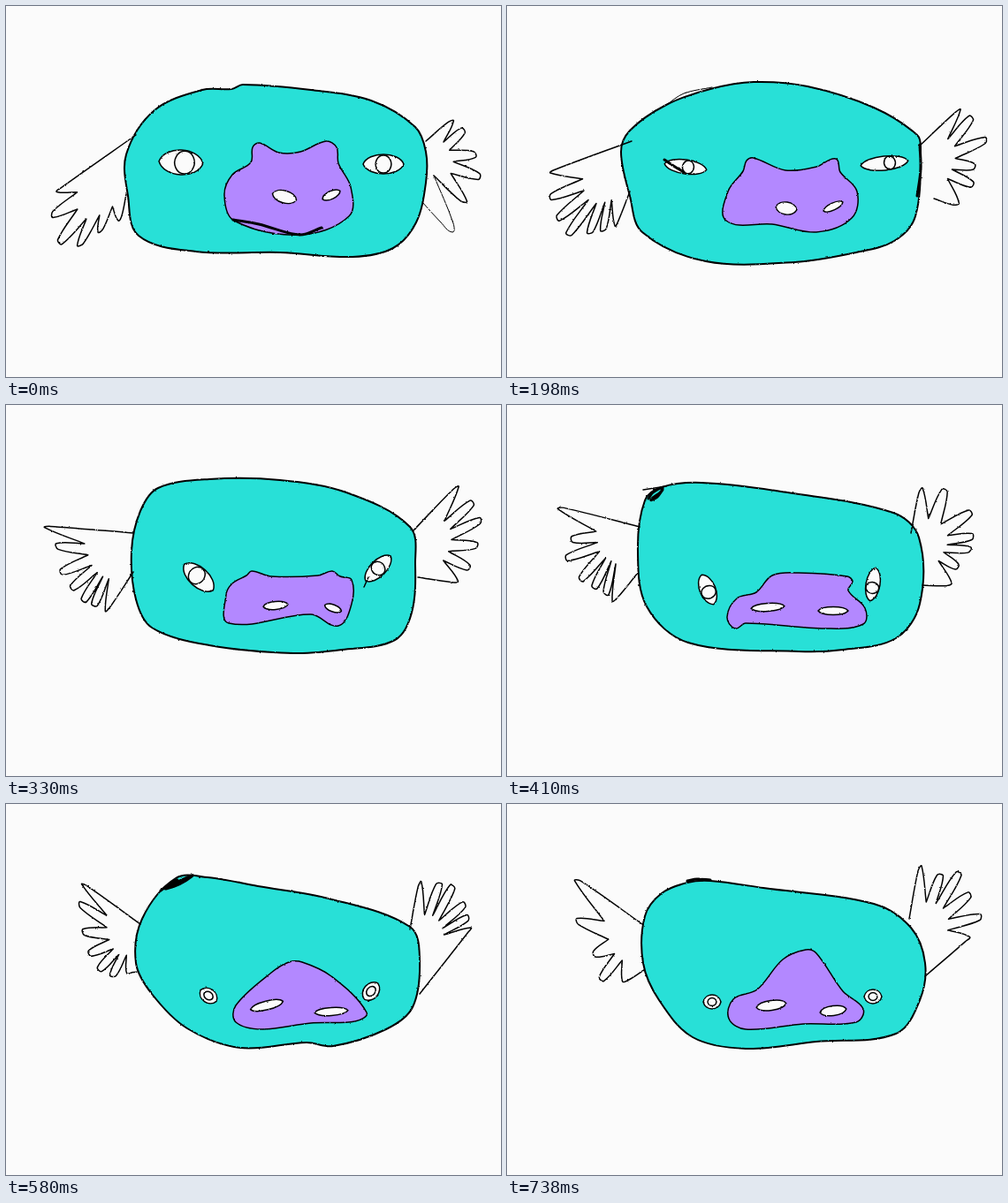
An HTML page that plays this animation: 560 by 420 pixels, repeating every 0.79 s.

```html
<!DOCTYPE html>
<html lang="en">
<head>
<meta charset="utf-8">
<title>Flapping creature</title>
<style>
  html, body { margin: 0; width: 100%; height: 100%; overflow: hidden; background: #fbfbfb; }
  #stage { width: 560px; height: 420px; overflow: hidden; }
  #strip { display: block; width: 3920px; height: 420px; animation: flip 790ms step-end infinite; }
  /* one pose per 560px cell, with uneven holds */
  @keyframes flip {
    0% { transform: translateX(0); }
    15.19% { transform: translateX(-560px); }
    31.646% { transform: translateX(-1120px); }
    41.772% { transform: translateX(-1680px); }
    51.899% { transform: translateX(-2240px); }
    73.418% { transform: translateX(-2800px); }
    83.544% { transform: translateX(-3360px); }
  }
  path { fill: none; stroke: #000; stroke-width: 1.5; stroke-linecap: round; stroke-linejoin: round; }
  .body { fill: #28e0d7; stroke-width: 2; }
  .snout { fill: #b388ff; }
  .white { fill: #fbfbfb; }
  .thin { stroke-width: 1; }
  .heavy { stroke-width: 3; }
</style>
</head>
<body>
<div id="stage">
  <svg id="strip" viewBox="0 0 3920 420">
    <filter id="rough" x="-5%" y="-5%" width="110%" height="110%" color-interpolation-filters="sRGB">
      <feTurbulence type="fractalNoise" baseFrequency=".35" numOctaves="2" seed="4"/>
      <feDisplacementMap in="SourceGraphic" scale="2" xChannelSelector="R" yChannelSelector="G"/>
    </filter>
  </svg>
</div>
<script>
const strip = document.getElementById("strip");
const parse = text => text.split(" ").map(p => p.split(",").map(Number));

function add(parent, tag, attrs) {
  const node = document.createElementNS("http://www.w3.org/2000/svg", tag);
  for (const key in attrs) node.setAttribute(key, attrs[key]);
  return parent.appendChild(node);
}

// Smooth curve whose handles scale with each segment; a doubled point is a corner.
function curve(pts, closed) {
  const n = pts.length;
  const at = i => closed ? pts[(i + n) % n] : pts[Math.max(0, Math.min(n - 1, i))];
  const handle = (i, reach) => {
    const [ax, ay] = at(i - 1), [bx, by] = at(i + 1), [x, y] = at(i);
    const k = reach / (Math.hypot(bx - ax, by - ay) || 1);
    return [x + (bx - ax) * k, y + (by - ay) * k];
  };
  let d = "M" + pts[0];
  for (let i = 0; i < (closed ? n : n - 1); i++) {
    const a = at(i), b = at(i + 1);
    const reach = Math.hypot(b[0] - a[0], b[1] - a[1]) / 3;
    d += "C" + [handle(i, reach), handle(i + 1, -reach), b].join(" ");
  }
  return closed ? d + "Z" : d;
}

class Pose {
  static count = 0;

  constructor() {
    const x = 560 * Pose.count++;
    this.cell = add(strip, "g", { transform: `translate(${x} 0)`, filter: "url(#rough)" });
  }
  shape(look, text) {
    add(this.cell, "path", { class: look, d: curve(parse(text), true) });
    return this;
  }
  line(look, text) {
    add(this.cell, "path", { class: look, d: curve(parse(text)) });
    return this;
  }
  // Feathers reach each tip and fold back toward the palm in between.
  wing(start, end, palm, text, depth = 0.5) {
    const tips = parse(text), pts = [start];
    tips.forEach(([x, y], i) => {
      const prev = tips[i - 1] || start, next = tips[i + 1];
      const [nx, ny] = next || end;
      const k = 3.5 / Math.hypot(nx - prev[0], ny - prev[1]);
      const dx = (nx - prev[0]) * k, dy = (ny - prev[1]) * k;
      pts.push([x - dx, y - dy], [x + dx, y + dy]);
      if (!next) return;
      const mx = (x + nx) / 2, my = (y + ny) / 2;
      const fold = [mx + (palm[0] - mx) * depth, my + (palm[1] - my) * depth];
      pts.push(fold, fold);
    });
    add(this.cell, "path", { d: curve([...pts, end]) });
    return this;
  }
  lens(x, y, rx, ry, turn) {
    const hx = rx * 0.75, hy = ry * 1.33;
    const place = `translate(${x} ${y}) rotate(${turn})`;
    const d = `M${-rx} 0C${-hx} ${-hy} ${hx} ${-hy} ${rx} 0C${hx} ${hy} ${-hx} ${hy} ${-rx} 0Z`;
    add(this.cell, "path", { class: "white", d, transform: place });
    return this;
  }
  eye(x, y, rx, ry, turn, shift = 0) {
    this.lens(x, y, rx, ry, turn);
    const w = Math.min(ry * 0.8, rx * 0.5), h = rx > ry * 1.5 ? ry * 0.92 : ry * 0.55;
    const d = `M${shift} ${-h}a${w} ${h} 0 1 0 .01 0Z`;
    add(this.cell, "path", { d, transform: `translate(${x} ${y}) rotate(${turn})` });
    return this;
  }
}

new Pose()
  .shape("body", "268,89 345,95 413,107 463,137 475,165 475,200 464,245 438,274 392,284 310,279 215,278 150,260 138,215 136,168 168,118 222,95 255,94")
  .wing([147, 146], [136, 213], [125, 190], "60,208 53,236 61,267 84,270 107,254 129,240", 0.35)
  .wing([475, 153], [484, 192], [480, 172], "503,131 517,141 530,168 535,193 518,221")
  .line("thin", "471,222 492,245 505,256 506,246 484,192")
  .shape("snout", "277,177 279,160 287,155 309,166 333,165 362,153 374,160 376,178 390,205 388,238 333,259 258,243 247,214 256,191")
  .line("heavy", "257,242 286,247 332,259 357,251")
  .lens(315, 216, 14, 7, 15).lens(368, 214, 11, 4.5, -25)
  .eye(198, 177, 25, 14, 3, 4).eye(427, 179, 23, 11, 0);

new Pose()
  .shape("body", "279,86 340,91 415,115 464,146 468,162 462,238 438,266 395,279 325,290 225,289 153,256 139,215 129,165 139,141 180,112 230,94")
  .line("thin", "180,112 200,99 232,92")
  .wing([141, 153], [139, 210], [120, 190], "52,187 50,216 58,240 70,258 94,256 109,253 124,246")
  .wing([467, 158], [483, 218], [480, 178], "510,119 525,127 541,152 528,182 526,202 508,224")
  .line("heavy", "467,157 468,185 464,215")
  .shape("snout", "267,187 271,175 279,172 315,186 350,182 372,173 377,188 396,210 390,240 350,256 300,247 248,243 250,210")
  .lens(316, 229, 12, 7, 8).lens(369, 227, 12, 4, -25)
  .eye(202, 182, 24, 8, 8, 3).eye(427, 178, 27, 8, -6, 6)
  .line("heavy", "178,174 190,182 200,188");

new Pose()
  .shape("body", "188,97 230,86 290,85 360,98 415,110 458,142 471,180 466,230 445,264 395,281 310,283 215,273 155,253 145,225 132,185 145,137")
  .line("heavy", "177,96 187,93 200,91")
  .wing([138, 150], [134, 204], [112, 178], "49,151 50,185 58,209 68,224 82,231 99,243")
  .wing([467, 153], [473, 213], [482, 170], "516,110 522,122 538,138 539,150 540,172 534,187 522,196", 0.45)
  .shape("snout", "278,186 278,172 284,164 298,178 368,181 378,175 385,196 394,215 388,247 350,250 293,242 247,245 258,208")
  .lens(315, 228, 12, 7, 0).lens(370, 220, 10, 4, -15)
  .eye(213, 186, 23, 11, 30, 2).eye(421, 179, 26, 8, -17, 6)
  .line("thin", "187,175 204,174");

new Pose()
  .shape("body", "172,94 230,84 310,85 385,99 457,138 463,180 459,235 440,266 380,277 325,281 230,272 165,252 147,220 142,165 152,120")
  .wing([144, 145], [144, 189], [125, 165], "47,138 58,160 63,189 75,207 88,221 100,226 115,231")
  .wing([461, 142], [466, 195], [474, 160], "509,94 527,111 536,131 532,159 523,184 508,200")
  .shape("snout", "272,193 278,188 300,194 353,193 369,188 378,194 391,198 391,225 376,250 345,237 252,247 249,215 256,202")
  .lens(305, 227, 14, 4.5, -5).lens(370, 230, 10, 4, 20)
  .eye(218, 195, 22, 11, 42, -3).eye(421, 185, 20, 9, -45)
  .line("line", "405,206 410,195");

new Pose()
  .shape("body", "175,93 220,88 310,98 437,122 466,150 467,225 440,264 380,277 330,279 205,269 158,228 148,165 156,108")
  .line("line", "154,96 180,92")
  .line("heavy", "160,106 165,99 176,95 163,107 170,104 176,96")
  .wing([150, 138], [148, 190], [128, 150], "61,117 74,152 68,173 84,197 99,206 112,213 122,220", 0.55)
  .wing([457, 145], [470, 204], [472, 160], "468,97 495,97 524,122 526,149 523,164 509,183 500,203")
  .shape("snout", "282,212 300,193 330,190 385,194 391,200 386,210 405,230 403,248 360,253 270,247 258,253 249,240 260,219")
  .lens(295, 229, 19, 4.5, -4).lens(369, 233, 17, 4.5, 0)
  .eye(227, 209, 18, 9, 68, 3).eye(414, 203, 19, 8, 100, 4);

new Pose()
  .shape("body", "192,84 228,83 285,93 365,107 457,139 468,175 460,230 430,255 370,274 340,270 265,276 205,254 165,215 147,180 154,130")
  .line("heavy", "175,98 193,86 181,96 210,82 186,92")
  .wing([152, 136], [148, 190], [142, 150], "89,92 84,114 88,145 95,169 106,187 121,194 140,191")
  .wing([457, 142], [468, 215], [468, 160], "468,91 490,91 505,94 518,114 522,129 524,143")
  .shape("snout", "320,179 335,179 368,195 408,236 395,246 345,248 290,255 260,247 260,228 300,191")
  .lens(295, 228, 19, 5, -14).lens(368, 235, 19, 4.5, -4)
  .eye(229, 217, 11, 8, 35).eye(413, 212, 12, 8.5, -50);

new Pose()
  .shape("body", "204,89 230,87 290,95 415,113 457,140 473,180 467,222 440,260 350,269 270,277 210,264 172,222 154,180 156,127 175,101")
  .line("heavy", "204,87 215,85 230,86")
  .wing([153, 136], [155, 188], [140, 155], "80,87 80,133 99,170 107,198 134,200")
  .wing([455, 130], [473, 195], [470, 145], "467,73 490,81 511,79 523,103 535,128 521,153")
  .shape("snout", "338,165 350,169 380,212 403,232 395,247 335,249 270,255 251,243 256,221 283,210 312,176")
  .lens(299, 228, 17, 5.5, -8).lens(369, 234, 15, 5.5, -8)
  .eye(232, 224, 10, 8, 0).eye(414, 218, 10, 8, 0);
</script>
</body>
</html>
```
